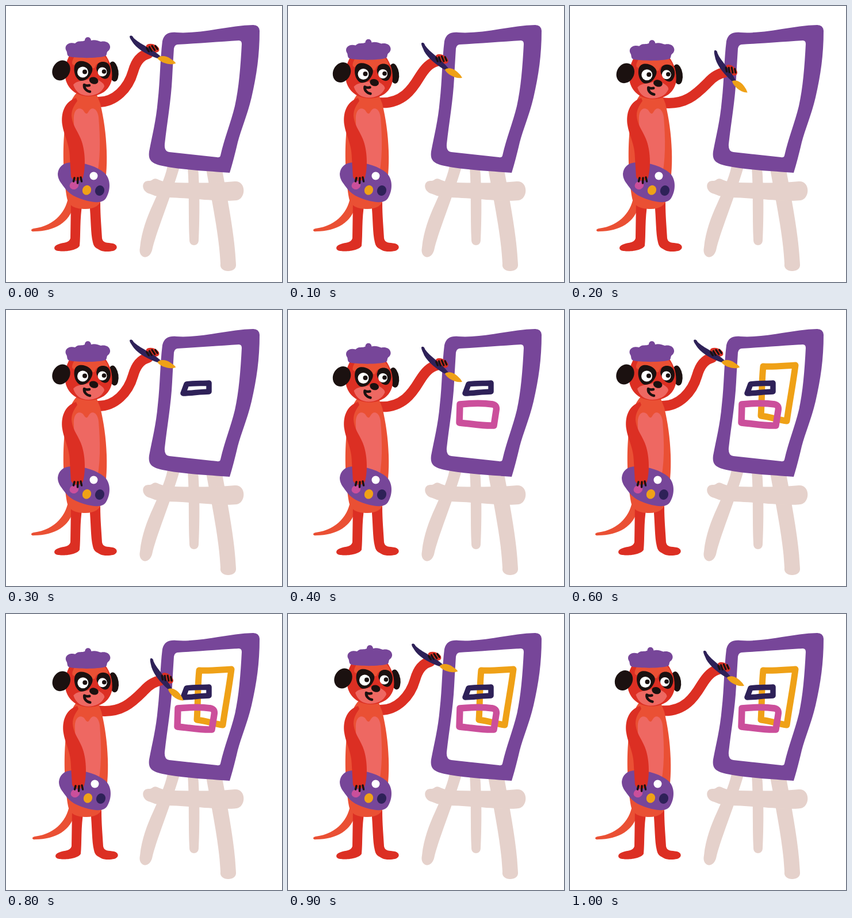
Write an HTML page that moves like this. It is 480 px wide and 480 px high and loops after 1100 ms.

```html
<!DOCTYPE html>
<html lang="en">
<head>
<meta charset="utf-8">
<title>Meerkat painter</title>
<style>
html, body { margin: 0; width: 100%; height: 100%; overflow: hidden; background: #fff; }
svg { display: block; width: 100vw; height: 100vh; }
.red { fill: #dc2f23; }
.orange { fill: #ea5034; }
.rose { fill: #ee6862; }
.purple { fill: #774699; }
.navy { fill: #2e2158; }
.gold { fill: #efa117; }
.pink { fill: #cb4f9b; }
.beige { fill: #e5d1cb; }
.black { fill: #1b1110; }
.white { fill: #fff; }
.line { fill: none; stroke-linecap: round; stroke-linejoin: round; }
.claw { stroke: #1b1110; }
</style>
</head>
<body>
<svg viewBox="0 0 480 480">
  <g id="easel">
    <g class="beige">
      <path d="M281 278C271 325 239 362 233 420C229 438 248 444 254 425C261 393 284 340 302 280Z"/>
      <path d="M316 280C319 320 317 365 319 407C319 419 335 419 335 407C337 365 337 320 334 280Z"/>
      <path d="M348 283C358 340 371 400 373 448C370 465 401 465 400 450C398 400 386 340 376 285Z"/>
      <path d="M248 304C254 305 256 298 263 301C272 305 280 307 290 307C330 308 365 308 398 305C418 304 418 335 401 338C370 341 315 333 277 333C260 332 255 328 248 326C235 321 235 304 248 304Z"/>
    </g>
    <path class="purple" d="M272 61C275 48 284 45 296 46C340 49 385 34 430 33Q440 33 441 43C441 85 436 120 427 159C419 192 409 214 403 237C398 258 394 274 389 290C350 287 305 285 272 278C253 274 247 268 249 253C254 226 261 200 264 165C268 130 268 92 272 61Z"/>
    <path class="white" d="M298 67C335 65 372 62 405 60Q410 60 410 66C408 105 405 143 398 174C391 203 380 229 373 260Q372 264 367 263L284 254Q275 253 276 240C280 203 287 165 289 125C290 105 291 90 292 74Q293 68 298 67Z"/>
    <path id="goldBox" class="line" stroke="#efa117" stroke-width="11" d="M336 98C355 99 372 97 392 96C388 128 382 158 377 193C362 191 349 186 332 184C334 155 333 127 336 98Z"/>
    <path id="pinkBox" class="line" stroke="#cb4f9b" stroke-width="11.500" d="M299 164C320 162 342 162 356 164Q364 166 362 175L358 201C340 202 320 198 298 196Z"/>
    <path id="navyBox" class="line" stroke="#2e2158" stroke-width="9.500" d="M314 129C328 127 342 128 353 127L353 142C338 142 322 145 308 145Z"/>
  </g>

  <path id="arm" class="line" stroke="#dc2f23" stroke-width="18"/>

  <g id="body">
    <path class="orange" d="M109 328C106 355 87 382 48 387C42 388 43 393 49 392C84 392 112 376 118 345Z"/>
    <g class="red">
      <path d="M113 340L112 404C110 412 100 411 92 414C81 417 82 426 92 426C105 428 125 424 128 417C130 398 128 370 133 342Z"/>
      <path d="M145 342C148 370 147 395 151 411C153 421 158 421 164 425C170 428 181 427 186 426C196 423 194 415 186 413C176 411 169 413 167 404C166 385 164 365 164 342Z"/>
    </g>
    <path class="orange" d="M122 152C110 165 104 190 101 225C98 265 101 305 106 334C109 349 122 353 138 353C154 353 164 347 168 332C174 306 176 280 175 252C174 222 170 195 164 170L157 152Z"/>
    <path class="rose" d="M118 200C116 176 131 174 136 184Q140 191 144 183C149 174 159 178 161 193C164 230 165 270 156 305L120 305Z"/>
    <path class="purple" d="M90 292C91 280 99 273 112 272C135 271 158 279 171 290C183 301 182 321 174 334C169 343 155 342 142 339C122 334 109 327 101 315C96 308 90 302 90 292Z"/>
    <circle class="white" cx="152.500" cy="295.500" r="7"/>
    <ellipse class="pink" cx="118.500" cy="312" rx="8" ry="7" transform="rotate(-25 118 312)"/>
    <ellipse class="gold" cx="140.500" cy="320" rx="7.500" ry="8.500" transform="rotate(25 140 320)"/>
    <ellipse class="navy" cx="163" cy="321" rx="8" ry="9" transform="rotate(20 163 321)"/>
    <path class="red" d="M122 160C101 166 95 188 98 207C101 226 111 240 111 265L113 297C117 306 130 306 134 298C139 280 138 250 130 231C123 215 115 206 114 191C114 180 118 174 124 165Z"/>
    <path class="line claw" stroke-width="3.500" d="M119 299L117.500 305M125 299L124.500 308M130 298L131.500 305"/>
  </g>

  <g id="head">
    <ellipse class="black" cx="187" cy="114" rx="8.500" ry="17.500" transform="rotate(-8 187 114)"/>
    <path class="red" d="M112 84C103 96 101 116 104 129C110 148 126 157 144 157C164 157 180 147 184 128C186 110 181 96 172 84Z"/>
    <path class="orange" d="M120 86C114 96 113 102 119 103C130 95 143 99 149 108L154 108C157 97 167 95 176 101C180 98 176 92 170 86Z"/>
    <path class="rose" d="M117 137C124 128 139 131 147 126Q154 123 159 128C166 132 171 135 171 140C166 151 155 156 143 156C131 156 121 150 117 137Z"/>
    <ellipse class="black" cx="96" cy="112" rx="15" ry="18" transform="rotate(28 96 112)"/>
    <path class="black" d="M120 102C124 93 137 95 144 100C151 105 152 111 148 118C144 126 138 130 131 130C121 129 116 112 120 102Z"/>
    <path class="black" d="M158 105C159 97 169 95 176 99C183 104 184 117 178 124C173 130 164 125 161 118C158 114 156 109 158 105Z"/>
    <circle class="white" cx="133.500" cy="115" r="9.500"/>
    <circle class="white" cx="167.500" cy="114.500" r="8"/>
    <circle class="black" cx="137" cy="114.500" r="4"/>
    <circle class="black" cx="170.500" cy="114" r="3.800"/>
    <ellipse class="black" cx="152.500" cy="129.500" rx="8" ry="6" transform="rotate(15 152 130)"/>
    <path class="line claw" stroke-width="4.500" d="M145 138C141 139 138 138 136 137C135 143 140 148 146 149"/>
    <path class="purple" d="M110 88C105 86 107 80 105 78C100 69 109 62 120 65C126 59 132 63 137 60C137 53 147 52 148 60C155 58 161 61 165 62C178 59 185 70 179 77C173 81 177 84 173 87C160 91 127 91 110 88Z"/>
  </g>

  <g id="brush">
    <ellipse class="red" cx="44" cy="-2" rx="12" ry="7" transform="rotate(-12 44 -2)"/>
    <path class="navy" d="M-1 0C0 -3 3 -3 6 -1C20 3 43 -1 63 3L60 9C45 12 25 13 12 8C6 5 0 3 -1 0Z"/>
    <path class="gold" d="M60 9C61 2 70 -3 81 -2Q87 -2 92 0C87 8 70 13 60 9Z"/>
    <path class="line claw" stroke-width="3.300" d="M35 3L41 6M38 -1L45 3M41 -5L49 -1M46 -8L52 -5"/>
  </g>
</svg>
<script>
const STEP = 100, STEPS = 11;

// Brush is [tip x, tip y, angle].
const poses = [
  { body: 0, head: [0, 0], brush: [216, 53, 30.3],
    arm: "M157 167C190 169 213 142 221 114C226 96 235 86 247 83" },
  { body: 0, head: [-2.5, 3.5], brush: [233, 65, 40.5],
    arm: "M157 168C199 172 217 143 229 123C239 107 247 99 259 96" },
  { body: 2, head: [0.3, 4.8], brush: [252, 78, 52],
    arm: "M159 168C201 174 222 151 240 133C250 122 258 118 270 115" }
];

// Step at which each painted box appears.
const boxes = { navyBox: 3, pinkBox: 4, goldBox: 5 };

const $ = id => document.getElementById(id);
const set = (id, name, value) => $(id).setAttribute(name, value);
let shown = -1;

function draw(step) {
  const { body, head, brush: [x, y, angle], arm } = poses[step % 3];
  set("body", "transform", `translate(${body} 0)`);
  set("head", "transform", `translate(${head})`);
  set("brush", "transform", `translate(${x} ${y}) rotate(${angle})`);
  set("arm", "d", arm);
  for (const id in boxes) {
    set(id, "visibility", step >= boxes[id] ? "visible" : "hidden");
  }
}

function tick() {
  const step = Math.floor(performance.now() / STEP) % STEPS;
  if (step !== shown) draw(shown = step);
  requestAnimationFrame(tick);
}
tick();
</script>
</body>
</html>
```
